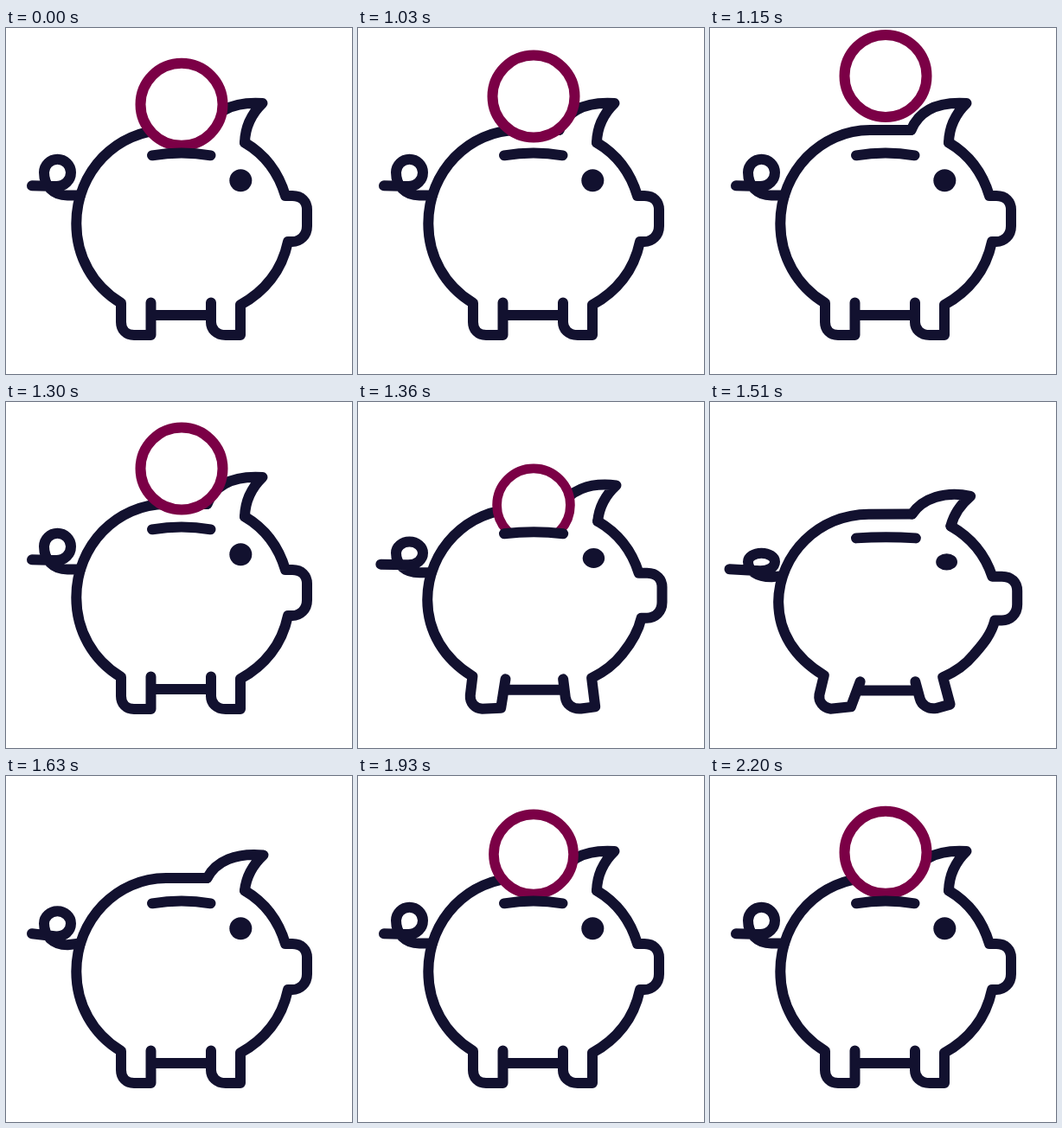
An HTML page that plays this animation: 400 by 400 pixels, repeating every 2230 ms.

```html
<!DOCTYPE html>
<html lang="en">
<head>
<meta charset="utf-8">
<title>Piggy bank</title>
<style>
  html, body { margin: 0; width: 100%; height: 100%; overflow: hidden; background: #fff; }
  svg { display: block; width: 100vw; height: 100vh; }
  .line { fill: none; stroke: #12112f; stroke-width: 12; stroke-linecap: round; stroke-linejoin: round; }
</style>
</head>
<body>
<svg viewBox="0 0 400 400">
  <defs><clipPath id="above"><rect id="mouth" width="400" height="146"/></clipPath></defs>
  <path id="tail" class="line"/>
  <path id="body" class="line"/>
  <path id="ear" class="line"/>
  <ellipse id="eye" fill="#12112f"/>
  <g clip-path="url(#above)">
    <circle id="coin" cx="203" r="47.5" fill="#fff" stroke="#7b0046" stroke-width="12"/>
  </g>
  <path id="slot" class="line"/>
</svg>
<script>
const LOOP = 2230, START = 1030, STEP = 30;
const $ = id => document.getElementById(id);
const mix = (a, b, k) => a + (b - a) * k;
const sine = p => 0.5 - 0.5 * Math.cos(Math.PI * p);
const out = p => 1 - (1 - p) * (1 - p);

// Each part: [relaxed pose, squashed pose] with matching commands
const poses = {
  body: [
    `M276 132.5 C299 146 315 167 323 194 L331 194 C342 194 348 201 348 210
     L348 229 C348 240 340 247 331 247 L326 247
     C322.5 263.5 316 278 306.4 290.3 C297 302.5 285 312.5 271 320
     L271 355 L254 355 C243 355 237 348 237 340 L237 317.5
     M237 332 L167.5 332 M167.5 317.5 L167.5 355 L148 355
     C139 355 133 349 133 340 L133 318
     C100 298 81.3 264 81.3 226 C81.3 166 128 118 185 118 L232.5 118`,
    `M284 169 C305 180 325 198 334 219.5 L352 219.5 C364 219.5 372 227 372 238
     L372 246 C372 258 364 265 352 265 L337 265
     C331 284 310 289 301 297 C291 308 280 311 265 314
     L293 337 L279 352 C274 357 262 355 256 350 L238 337
     M238 337 L188 337 M188 337 L152 346 L118 354
     C112 349 107 341 111 335 L129 312
     C95 290 75 275 74 243 C76 200 120 157 180 157 L236 156.5`
  ],
  ear: [
    'M232.5 118 C242 95 264 85 296.5 87 C283 100 276.5 114 276 132.5',
    'M236 156.5 C254 143 285 137 310 151 C300 156 292 162 284 169'
  ],
  tail: [
    `M86 193.5 L71 193.5 C54 193.5 44 182 44 167 C44 158.5 51 151.7 59.5 151.7
     C68 151.7 75 158.5 75 167 C75 176 68 183 58 183 L30 182.3`,
    `M78 219 L71 219 C54 219 44 219 44 219 C44 219 51 219 59.5 219
     C68 219 75 219 75 219 C75 219 68 219 58 219 L5 219`
  ],
  slot: ['M169 147.3 Q203 141.5 236.5 147.3', 'M169 181 Q205 187 241 181']
};

const number = /-?\d+(\.\d+)?/g;
// The two end points follow k, everything between follows mid
function pose(id, k, mid = k) {
  const [rest, flat] = poses[id];
  const ends = flat.match(number);
  let i = 0;
  $(id).setAttribute('d', rest.replace(number, v => {
    const w = i < 2 || i >= ends.length - 2 ? k : mid;
    return mix(+v, +ends[i++], w).toFixed(2);
  }));
}

function track(t, keys, ease) {
  if (t <= keys[0][0]) return keys[0][1];
  for (let i = 1; i < keys.length; i++) {
    const [t0, v0] = keys[i - 1], [t1, v1] = keys[i];
    if (t < t1) return mix(v0, v1, ease((t - t0) / (t1 - t0)));
  }
  return keys[keys.length - 1][1];
}

const squash = [[1330, 0], [1450, 1], [1545, 0]];
const trailing = [[1330, 0], [1450, 1], [1545, 0.06], [1600, 0.1], [1680, 0]];

function coinY(t) {
  if (t < START) return 88.3;
  if (t <= 1300) return 55 + 24 * ((t - 1168) / 138) ** 2;
  if (t < 1500) {
    const d = t - 1300;
    return 77 + 0.35 * d + 0.0059 * d * d;
  }
  if (t < 2005) return mix(185, 67, sine(Math.max(0, t - 1750) / 255));
  return mix(67, 88.3, out(Math.min(1, (t - 2005) / 195)));
}

function coinScale(t) {
  return track(t, [[1330, 1], [1400, 0.75], [1750, 0.75], [1955, 1]], p => p);
}

function draw(t) {
  const k = track(t, squash, sine), lag = track(t, trailing, sine);
  pose('body', k);
  pose('slot', k);
  pose('ear', k, lag);
  pose('tail', k, lag);

  const eye = { cx: mix(271.3, 279, k), cy: mix(176.3, 205, k), rx: mix(13, 11, k), ry: mix(13, 2, k) };
  for (const name in eye) $('eye').setAttribute(name, eye[name]);

  $('mouth').setAttribute('height', mix(146, 182, k));
  const y = coinY(t), s = coinScale(t);
  $('coin').setAttribute('transform', `translate(${203 * (1 - s)} ${y}) scale(${s})`);
  $('coin').style.display = t > 1419 && t <= 1750 ? 'none' : '';
}

const origin = performance.now();
function tick() {
  const t = (performance.now() - origin) % LOOP;
  draw(t < START ? 0 : START + Math.floor((t - START) / STEP) * STEP);
  requestAnimationFrame(tick);
}
tick();
</script>
</body>
</html>
```
